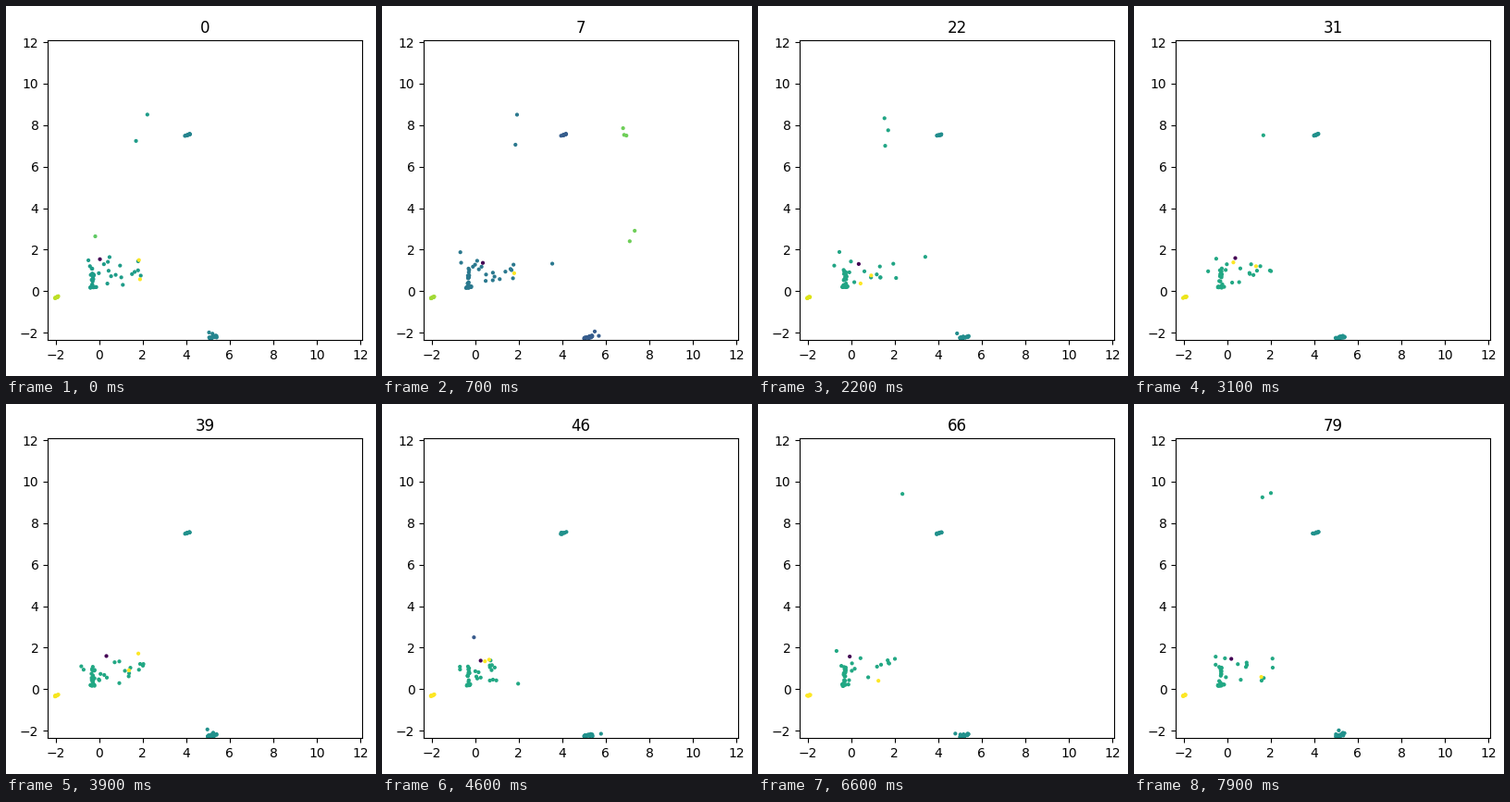
Animation of 400x400 px, one loop 8000 ms. Source, as a matplotlib script:

```python
import numpy as np
import matplotlib.pyplot as plt
from matplotlib.animation import FuncAnimation

FRAMES = 80
LIMITS = (-2.36, 12.08)


def levels(i, far):
    """Colour levels of the main, outer and left groups."""
    if far:
        return .4, .29, .86
    t = min(i / 30, 1)
    return .55 + .05 * t, .45 + .05 * t, .9 + .1 * min(i / 45, 1)


def box(rng, n, x0, x1, y0, y1):
    """Points spread evenly over a box."""
    return rng.uniform((x0, y0), (x1, y1), (n, 2))


def slope(rng, n, x0, x1, y0, y1, jitter):
    """Points strewn along a short rising line."""
    t = rng.random(n)
    return np.column_stack([x0 + (x1 - x0) * t,
                            y0 + (y1 - y0) * t + rng.normal(0, jitter, n)])


def population(i):
    rng = np.random.default_rng(i)
    far = i > 0 and i % 7 == 0
    main, outer, left = levels(i, far)

    column = np.column_stack([rng.normal(-.29, .04, 17),
                              rng.uniform(.2, 1.1, 17)])
    n = rng.integers(11, 17)
    cloud = np.column_stack([-.1 + 2.2 * rng.random(n) ** 1.3,
                             .2 + 1.5 * rng.beta(1.6, 2, n)])

    groups = [
        (column, main),
        (slope(rng, 9, -.42, -.12, .19, .22, .02), main),
        (cloud, main),
        (box(rng, 2, -.9, -.4, .8, 1.9), main),
        (slope(rng, 10, 3.93, 4.2, 7.49, 7.58, .015), outer),
        (slope(rng, 22, 4.98, 5.4, -2.28, -2.17, .03), outer),
        (slope(rng, 10, -2.03, -1.87, -.33, -.26, .01), left),
        # wanderers
        (box(rng, rng.integers(0, 4), 1, 2.4, 6.8, 9.5), main),
        (box(rng, rng.integers(0, 2), 2.5, 3.8, 1, 2), main),
        (box(rng, rng.integers(0, 3), 4.7, 5.8, -2.2, -1.9), outer),
        (box(rng, rng.integers(0, 2), -.2, .05, 2.5, 2.75),
         rng.choice([.28, .75])),
        (box(rng, 1, -.1, .6, 1.3, 1.6), 0),
        (box(rng, rng.integers(1, 3), 0, 1.9, .3, 1.8), 1),
    ]
    if far:
        groups += [(box(rng, 3, 6.7, 7.08, 7.4, 8.4), .78),
                   (box(rng, 2, 6.8, 7.6, 2, 3.1), .78)]

    xy = np.concatenate([pts for pts, _ in groups])
    c = np.concatenate([np.full(len(pts), v) for pts, v in groups])
    return xy, c


fig, ax = plt.subplots(figsize=(4, 4), dpi=100)
dots = ax.scatter([], [], c=[], s=4, cmap="viridis", vmin=0, vmax=1)
title = ax.set_title("0")

# Fit the margins while no tick label overhangs the axes, then set the view.
ax.set(xlim=(-3, 11), ylim=(-3, 11))
fig.tight_layout()
ax.set(xlim=LIMITS, ylim=LIMITS,
       xticks=range(-2, 13, 2), yticks=range(-2, 13, 2))


def update(i):
    xy, c = population(i)
    dots.set_offsets(xy)
    dots.set_array(c)
    title.set_text(str(i))
    return dots, title


anim = FuncAnimation(fig, update, frames=FRAMES, interval=100, repeat=True,
                     repeat_delay=0, blit=False)
plt.show()
```
